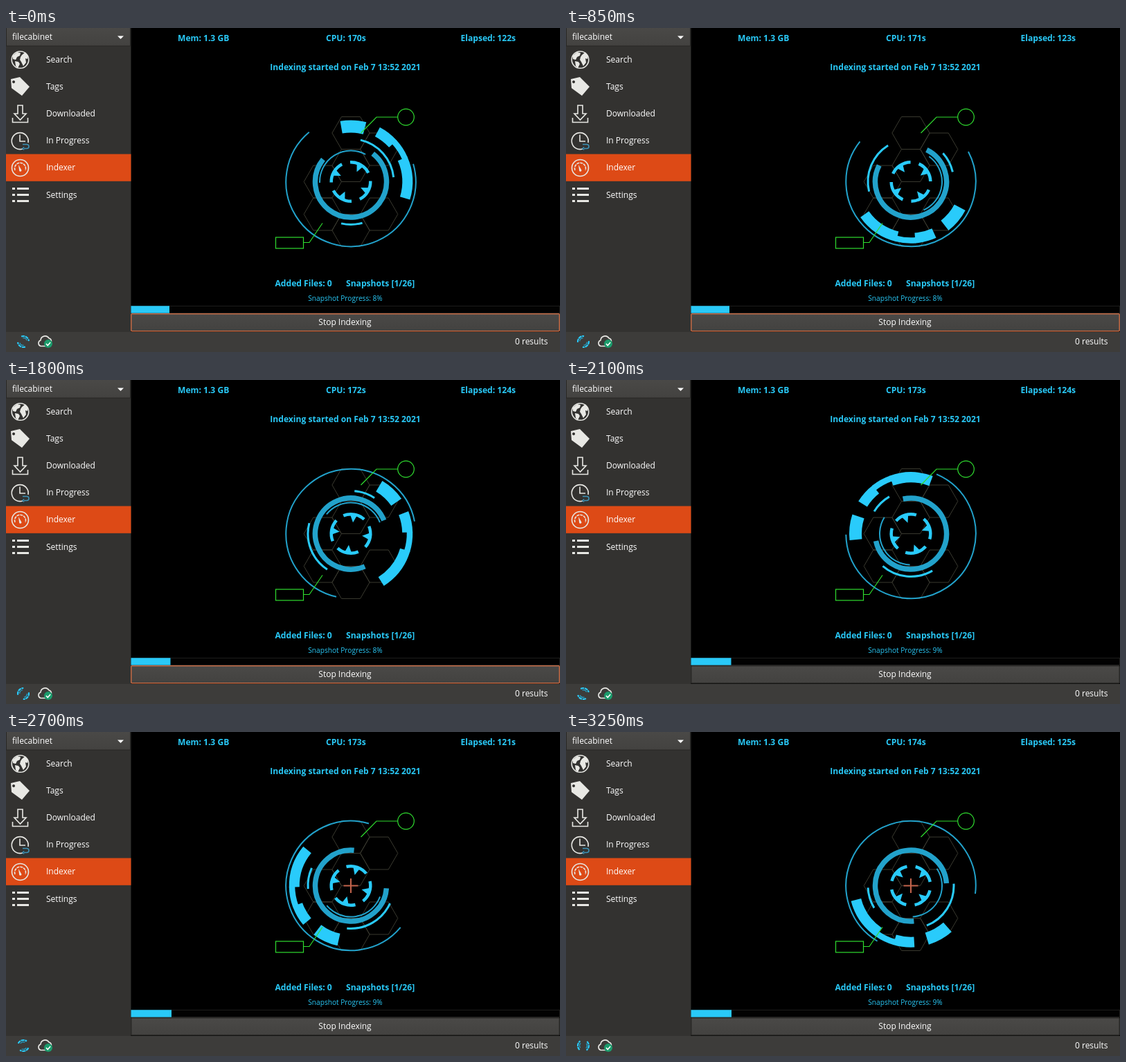
Recreate the animation shown at these times as an HTML page. Size 800x469 px, loop 3.3 s.

```html
<!DOCTYPE html>
<html lang="en">
<head>
<meta charset="utf-8">
<title>Indexer</title>
<style>
html, body { margin: 0; width: 100%; height: 100%; overflow: hidden; background: #000; }
svg { display: block; }
text { font: 12px "Open Sans", "Noto Sans", sans-serif; fill: #fff; white-space: pre; }
.head { font-weight: 700; font-size: 12.1px; fill: #29c9f7; }
.small { font-size: 10.15px; fill: #29c9f7; }
.mid { text-anchor: middle; }
.icon { fill: none; stroke: #e8e8e4; stroke-width: 1.6; }
.icon .solid { fill: #e8e8e4; stroke: none; }
.icon.bold { stroke-width: 3; }
.icon .blue { stroke: #3b93b8; }
.hex { fill: none; stroke: #3a3a30; }
.green { fill: none; stroke: #2fdc2f; stroke-width: 1.2; }
#hud path { fill: none; }
</style>
</head>
<body>
<svg id="stage" width="800" height="469" viewBox="0 0 800 469">
  <defs>
    <linearGradient id="raised" x2="0" y2="1">
      <stop stop-color="#4a4947"/><stop offset="1" stop-color="#434240"/>
    </linearGradient>
  </defs>
  <rect width="800" height="469"/>

  <!-- sidebar -->
  <rect width="180.500" height="440" fill="#333230"/>
  <rect x=".5" y="-1" width="179" height="27" fill="url(#raised)" stroke="#282725"/>
  <text x="9" y="17">filecabinet</text>
  <path d="M161 11.5h9l-4.500 4.500z" fill="#fff"/>
  <rect y="182.500" width="180.500" height="39.300" fill="#dd4a16"/>
  <g id="menu"></g>

  <g class="icon">
    <circle cx="20.500" cy="46" r="12.300"/>
    <path class="solid" d="M10 40l6-5 5 1-1 4-4 2-2 4-4-1zM13 48l5 1 2 3-3 6-3-3zM23 39l5-4 4 6-1 4-3-1 1 6-4 5-3-6-2-3 1-4z"/>
  </g>
  <g class="icon">
    <path class="solid" fill-rule="evenodd" d="M7 74l13-3 14 14-11 13-15-11zM11 76a2 2 0 1 0 .1 0z"/>
  </g>
  <path class="icon" d="M17 112h7v12h5l-8.500 9-8.500-9h5zM9.500 130v6.500h22V130"/>
  <g class="icon">
    <path d="M24 175a12 12 0 1 1 8-9M20 154.500v9.500h8"/>
    <path class="blue" d="M24 168.500h6a3 3 0 0 1 0 6h-4M26 172.500l-2 2 2 2"/>
  </g>
  <g class="icon">
    <circle cx="20.500" cy="202.500" r="12"/>
    <path d="M13 206a8 8 0 1 1 15 0" stroke-dasharray="4 1"/>
    <path class="solid" d="M18 198l4.500 8a1.800 1.800 0 0 1-3.300 1z"/>
  </g>
  <path class="icon bold" d="M9 232.500h4m3 0h17M9 241.500h4m3 0h17M9 250.500h4m3 0h17"/>

  <!-- heading -->
  <text class="head" x="248" y="19">Mem: 1.3 GB</text>
  <text class="head" x="462" y="19" id="cpu"></text>
  <text class="head" x="656.500" y="19" id="elapsed"></text>
  <text class="head mid" x="490" y="61">Indexing started on Feb 7 13:52 2021</text>

  <g id="hexes"></g>
  <g id="hud"></g>
  <g class="green">
    <path d="M512.500 152l22.500-23h31M430 310.500h8l19-28"/>
    <circle cx="577.500" cy="129" r="11.800"/>
    <rect x="389.500" y="303" width="40" height="16"/>
  </g>
  <path id="cross" d="M487.500 222.500h21M498 212v21" stroke="#c4644c" stroke-width="2"/>

  <!-- progress -->
  <text class="head" x="388.500" y="373.500">Added Files: 0</text>
  <text class="head" x="491" y="373.500">Snapshots [1/26]</text>
  <text class="small mid" x="490" y="395" id="percent"></text>
  <rect x="180.500" y="402.500" width="619" height="10" fill="#020202" stroke="#1d1d1c"/>
  <rect x="180.500" y="402.300" height="10.400" fill="#29c9f8" id="bar"/>
  <rect x="180.800" y="413.800" width="618.400" height="25" rx="1" fill="url(#raised)" stroke-width="1.500" id="button"/>
  <text class="mid" x="489.500" y="430">Stop Indexing</text>

  <!-- status bar -->
  <rect y="440" width="800" height="29" fill="#3d3c3a"/>
  <text x="735" y="458">0 results</text>
  <g id="spinner" fill="none"></g>
  <path class="icon" d="M57 460.500H50a4.500 4.500 0 0 1 0-8.500 6.500 6.500 0 0 1 12-3 5 5 0 0 1 3.500 5"/>
  <circle cx="61" cy="457" r="6" fill="#1b9c6c"/>
  <path d="M58 457l2.200 2.500 4-4.500" fill="none" stroke="#fff" stroke-width="1.600"/>
</svg>
<script>
const LOOP = 3300, STEP = 50;
const CX = 498, CY = 222.5;
const BRIGHT = "#29cbfb", DIM = "#22a2cb";
const $ = id => document.getElementById(id);

function add(parent, tag, attrs, text = "") {
  const node = document.createElementNS("http://www.w3.org/2000/svg", tag);
  for (const key in attrs) node.setAttribute(key, attrs[key]);
  node.textContent = text;
  parent.append(node);
  return node;
}

function polar(cx, cy, r, deg) {
  const a = deg * Math.PI / 180;
  return (cx + r * Math.cos(a)).toFixed(2) + " " + (cy + r * Math.sin(a)).toFixed(2);
}

function arc(parent, cx, cy, r, width, color, from, to) {
  return add(parent, "path", {
    d: `M${polar(cx, cy, r, from)}A${r} ${r} 0 ${+(to - from > 180)} 1 ${polar(cx, cy, r, to)}`,
    stroke: color, "stroke-width": width
  });
}

["Search", "Tags", "Downloaded", "In Progress", "Indexer", "Settings"].forEach((label, i) =>
  add($("menu"), "text", { x: 58, y: 50 + i * 39.1 }, label));

// Hexagon positions as [column, half row] around the dial
for (const [col, row] of [[0, -3], [1, -2], [0, -1], [-1, 0], [-1, 2], [1, 2], [0, 3]]) {
  const points = [0, 60, 120, 180, 240, 300]
    .map(a => polar(CX + col * 40.7, CY + row * 23.5, 27.1, a));
  add($("hexes"), "polygon", { points: points.join(" "), class: "hex" });
}

// Each ring turns at its own multiple of the shared angle
const rings = [];
function ring(speed, ...arcs) {
  const group = add($("hud"), "g", {});
  for (const [r, width, color, from, to] of arcs) arc(group, CX, CY, r, width, color, from, to);
  rings.push({ group, speed });
  return group;
}
ring(3, [93.7, 2, DIM, 344, 590], [51.5, 7.5, DIM, 308, 579]);
ring(-2,
  [45, 2, DIM, 178, 298],
  [80, 18, BRIGHT, 260, 284.5],
  [81.7, 15, BRIGHT, 298, 318],
  [85, 8.5, BRIGHT, 317.5, 336.5],
  [81.7, 15, BRIGHT, 336, 377]);
ring(-1, [62, 3, BRIGHT, 283, 354], [62, 3, BRIGHT, 74.5, 103]);

const arrowAngles = [29, 119, 209, 299];
const arrows = ring(1, ...arrowAngles.map(a => [28.3, 4.5, BRIGHT, a - 31, a + 34]));
for (const a of arrowAngles) {
  const points = [polar(CX, CY, 28, a - 11), polar(CX, CY, 16.5, a + 2), polar(CX, CY, 28, a + 10)];
  add(arrows, "polygon", { points: points.join(" "), fill: BRIGHT });
}

for (const a of [0, 180]) {
  arc($("spinner"), 25, 454, 8, 2.2, BRIGHT, a - 52, a + 52).setAttribute("stroke-dasharray", "5 .8");
  arc($("spinner"), 25, 454, 5.3, 1.2, DIM, a - 40, a + 40);
}

// [time, shared angle]; close pairs are hard jumps
const turn = [[0, 0], [100, 5.7], [150, 78.5], [300, 86.8], [850, 116.1], [1350, 136.9],
  [1400, 136.9], [1850, 162.5], [1900, 211.6], [2100, 223.1], [2700, 258.7], [3250, 285.7]];

function angleAt(t) {
  const i = Math.max(1, turn.findIndex(key => key[0] >= t));
  const [t0, a0] = turn[i - 1], [t1, a1] = turn[i];
  return a0 + (a1 - a0) * (t - t0) / (t1 - t0);
}

const held = (keys, t) => keys.filter(key => key[0] <= t).pop()[1];
const cpuKeys = [[0, 170], [150, 171], [1150, 172], [1900, 173], [3000, 174]];
const elapsedKeys = [[0, 122], [150, 123], [1150, 120], [1750, 124], [2400, 121], [3000, 125]];
const barKeys = [[0, 55.5], [1150, 57], [1900, 58], [2400, 58.5]];

function render(now) {
  const t = Math.floor(now % LOOP / STEP) * STEP;
  const angle = angleAt(t);
  for (const { group, speed } of rings)
    group.setAttribute("transform", `rotate(${speed * angle} ${CX} ${CY})`);
  $("spinner").setAttribute("transform", `rotate(${121 + 4 * angle} 25 454)`);
  $("cpu").textContent = `CPU: ${held(cpuKeys, t)}s`;
  $("elapsed").textContent = `Elapsed: ${held(elapsedKeys, t)}s`;
  $("percent").textContent = `Snapshot Progress: ${t < 1900 ? 8 : 9}%`;
  $("bar").setAttribute("width", held(barKeys, t));
  $("button").setAttribute("stroke", t < 1900 ? "#c36a45" : "#2b2a28");
  $("cross").style.display = (t >= 1150 && t < 1750) || t >= 2400 ? "" : "none";
}

const start = performance.now();
function tick() {
  render(performance.now() - start);
  requestAnimationFrame(tick);
}
tick();
</script>
</body>
</html>
```
